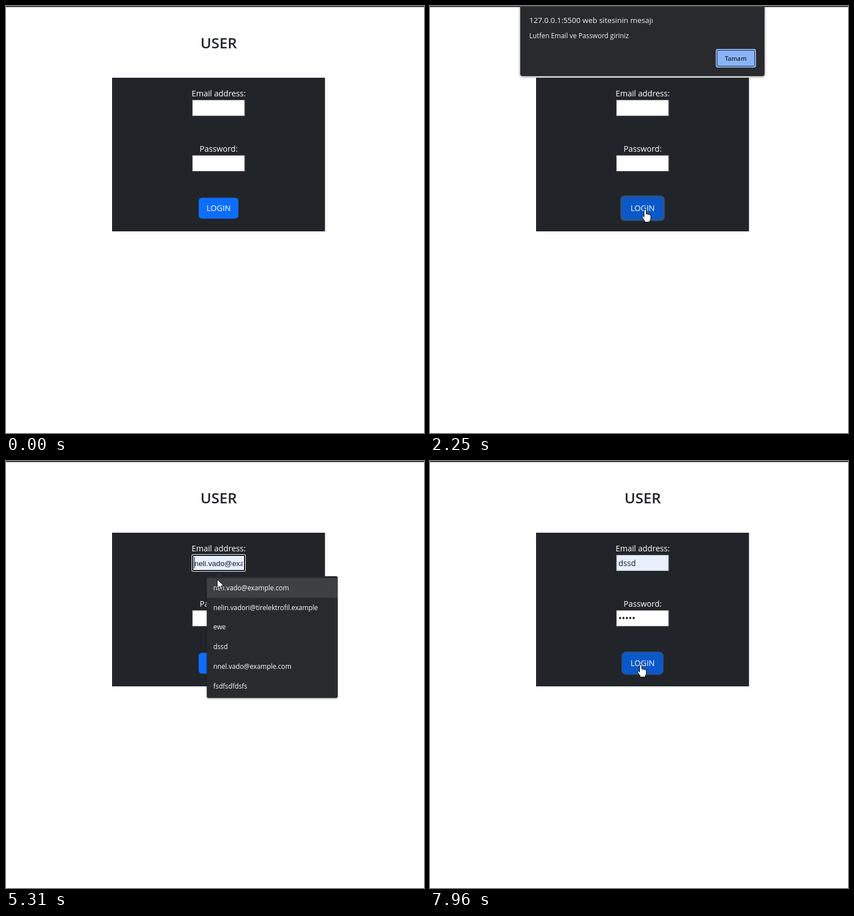
Write an HTML page that moves like this. It is 741 by 756 pixels and loops after 8000 ms.

```html
<!DOCTYPE html>
<html lang="en">
<head>
<meta charset="utf-8">
<title>User login</title>
<style>
  html, body { margin: 0; width: 100%; height: 100%; overflow: hidden; background: #fff; }
  svg { position: absolute; left: 0; top: 0; font: 14.2px "Open Sans", "Noto Sans", sans-serif; }
  .mid { text-anchor: middle; }
  .light { font-weight: 500; }
  #dialog {
    left: 160px; width: 433px; height: 124px; background: #292a2d; border-radius: 0 0 4px 4px;
    box-shadow: 0 1px 4px rgba(0, 0, 0, .55); transform-origin: 50% 0; fill: #f1f3f4;
  }
  #menu { font-size: 11.8px; fill: #fff; filter: drop-shadow(0 1px 1.5px rgba(0, 0, 0, .4)); }
  .preview { font: 13.33px "Liberation Sans", Arial, sans-serif; }
</style>
</head>
<body>
<svg width="741" height="756">
  <text class="mid" x="377" y="75" font-size="26" font-weight="600" fill="#212529">USER</text>
  <path d="M188 127h377.5v272H188z" fill="#212529"/>
  <g class="mid light" fill="#fff">
    <text x="377" y="160">Email address:</text>
    <text x="377" y="258">Password:</text>
  </g>
  <g id="email"></g>
  <g id="password"></g>
  <rect id="ring" rx="8" fill="#295493"/>
  <rect id="button" x="341.5" y="339.5" width="70.5" height="37" rx="6"/>
  <text class="mid light" x="377" y="363" fill="#fff">LOGIN</text>
</svg>

<svg id="dialog">
  <text class="light" x="16" y="30" font-size="13.4">127.0.0.1:5500 web sitesinin mesajı</text>
  <text class="light" x="16" y="57" font-size="11.8">Lutfen Email ve Password giriniz</text>
  <rect x="348" y="77" width="70" height="31.5" rx="4" fill="#8ab4f8"/>
  <rect id="okFocus" x="347.5" y="77" width="69.5" height="31" rx="3" fill="none" stroke="#8ab4f8" stroke-width="2"/>
  <rect id="okGap" x="349" y="78.5" width="66.5" height="28" rx="2" fill="none" stroke="#292a2d"/>
  <text class="mid" x="382" y="96.5" font-size="10.8" font-weight="600" fill="#202124" id="okText">Tamam</text>
</svg>

<svg width="741" height="756">
  <g id="menu" class="light">
    <path d="M370 204l7-7 7 7z" fill="#292a2d"/>
    <rect x="356" y="204" width="232" height="215.5" rx="3" fill="#292a2d"/>
    <rect id="hover" x="356" width="232" height="34.7" fill="#3f4042"/>
    <g id="items"></g>
  </g>
  <path d="M0 0h741v2H0z" fill="#3b3c3f"/>
  <path id="cursor" stroke="#000" stroke-linejoin="round"/>
</svg>

<script>
const $ = id => document.getElementById(id);
const LOOP = 8000, ROW = 34.7, MENU_TOP = 207.5;
const OPEN = 2020, CLOSE = 4480, PICK = 5890;
const CLICK_LOGIN = 1890, CLICK_EMAIL = 5130, CLICK_PASSWORD = 6250, CLICK_AGAIN = 7890;
const suggestions = [
  "neli.vado@example.com", "nelin.vadori@tirelektrofil.example", "ewe",
  "dssd", "nnel.vado@example.com", "fsdfsdfdsfs"
];
const shapes = {
  arrow: "M0 0V16L4 12.5 6.5 18.5 9 17.5 6.5 11.5H11.5Z",
  hand: "M-2 2Q-2 0 0 0T2 2V8Q4 6.5 5 8.5 7 7.5 8 9.5 10 8.5 10 11V15Q10 18 8 20V22H-1V20L-5 14Q-6 11-4 11L-2 13Z",
  beam: "M-3-8H-1Q0-8 0-7 0-8 1-8H3M0-7V7M-3 8H-1Q0 8 0 7 0 8 1 8H3"
};
// time, x, y, pointer shape from that time on
const path = [
  [770, 212, 697, "arrow"], [1050, 400, 520, "arrow"], [1250, 478, 326, "arrow"],
  [1410, 400, 345, "hand"], [1570, 380, 374, "hand"], [1650, 380, 374, "hand"],
  [1810, 381, 360, "hand"], [3569, 381, 360, "hand"], [3570, 401, 331, "hand"],
  [3690, 401, 331, "arrow"], [4130, 560, 32, "arrow"], [4370, 547, 84, "arrow"],
  [4620, 547, 84, "arrow"], [4980, 372, 180, "beam"], [5170, 372, 180, "beam"],
  [5230, 374, 196, "arrow"], [5310, 374, 209, "arrow"], [5370, 374, 209, "arrow"],
  [5630, 372, 325, "arrow"], [PICK, 372, 325, "arrow"], [6090, 357, 285, "beam"],
  [6250, 355, 279, "beam"], [7480, 355, 279, "beam"], [7560, 360, 300, "arrow"],
  [7700, 371, 345, "hand"], [7810, 373, 360, "hand"], [LOOP, 373, 360, "hand"]
];
const buttonColors = [
  [0, "#0d6efd"], [1410, "#0b5ed7"], [CLICK_LOGIN, "#0a58ca"], [CLOSE, "#0b5ed7"],
  [CLICK_EMAIL, "#0d6efd"], [7700, "#0b5ed7"], [CLICK_AGAIN, "#0a58ca"]
];

const clamp = v => Math.max(0, Math.min(1, v));
const between = (t, a, b) => t >= a && t < b;
const show = (el, on) => el.style.display = on ? "" : "none";
function set(el, attrs) {
  for (const name in attrs) el.setAttribute(name, attrs[name]);
}

$("items").innerHTML = suggestions.map((s, i) =>
  `<text x="367.5" y="${229 + i * ROW}">${s}</text>`).join("");

function field(id, y, { text = "", focus, fill = "#fff", caret, preview, size = 14.2 }) {
  const frame = focus
    ? `<rect x="329" y="${y - 1}" width="96" height="31" rx="3" fill="#fff"/>
       <rect x="331" y="${y + 1}" width="92" height="27" rx="1" fill="${fill}" stroke="#101010" stroke-width="2"/>`
    : `<rect x="330.5" y="${y + .5}" width="92.5" height="28" fill="${fill}" stroke="#767676"/>`;
  const bar = caret === undefined ? "" : `<path d="M${caret} ${y + 4}h1v20h-1z"/>`;
  $(id).innerHTML = `${frame}<svg x="333" y="${y}" width="87" height="29">
    <text x="1" y="20" ${preview ? 'class="preview"' : `font-size="${size}"`} fill="#111827">${text}</text></svg>${bar}`;
}

function pointer(t) {
  if (t < path[0][0]) return null;
  const i = path.findIndex(k => k[0] > t);
  const [t0, x0, y0, shape] = path[i - 1], [t1, x1, y1] = path[i];
  const p = (t - t0) / (t1 - t0);
  return { x: x0 + (x1 - x0) * p, y: y0 + (y1 - y0) * p, shape };
}

function drawDialog(t) {
  const alpha = t < CLOSE ? clamp((t - OPEN) / 230) : 1 - clamp((t - CLOSE) / 206);
  const tilt = Math.pow(1 - alpha, .6);
  show($("dialog"), alpha > 0);
  $("dialog").style.opacity = alpha;
  $("dialog").style.transform = tilt
    ? `translateY(${-18 * tilt}px) perspective(1400px) rotateX(${-10 * tilt}deg)` : "none";
  const pressed = t >= 4450;
  show($("okFocus"), !pressed);
  show($("okGap"), !pressed);
  set($("okText"), { opacity: pressed ? .75 : 1 });
}

function drawForm(t, row) {
  const previewing = between(t, 5310, PICK), picked = t >= PICK;
  const emailFocus = between(t, CLICK_EMAIL, CLICK_PASSWORD);
  field("email", 166, {
    text: previewing ? suggestions[row] : picked ? "dssd" : "",
    fill: previewing || picked ? "#e8f0fe" : "#fff",
    focus: emailFocus, preview: previewing,
    caret: emailFocus ? (picked ? 366 : 333.5) : undefined
  });

  const dots = Math.max(0, Math.min(5, Math.floor((t - 7060) / 90) + 1));
  const passwordFocus = between(t, CLICK_PASSWORD, CLICK_AGAIN);
  field("password", 264, {
    text: "•".repeat(dots), size: 16, focus: passwordFocus,
    caret: passwordFocus && !between(t, 6880, 7060) ? 334 + dots * 6.1 : undefined
  });

  const focusStart = t >= CLICK_AGAIN ? CLICK_AGAIN : CLICK_LOGIN;
  const ring = between(t, CLICK_EMAIL, CLICK_AGAIN) ? 0 : 4 * clamp((t - focusStart) / 150);
  set($("ring"), { x: 341.5 - ring, y: 339.5 - ring, width: 70.5 + 2 * ring, height: 37 + 2 * ring });
  show($("ring"), ring > 0);
  set($("button"), { fill: buttonColors.filter(c => c[0] <= t).pop()[1] });
}

function draw(now) {
  const t = now % LOOP, p = pointer(t);
  const row = p ? Math.max(0, Math.min(3, Math.floor((p.y - MENU_TOP) / ROW))) : 0;
  drawForm(t, row);
  drawDialog(t);

  show($("menu"), between(t, 5170, PICK));
  show($("hover"), t >= 5310);
  set($("hover"), { y: MENU_TOP + row * ROW });

  show($("cursor"), p);
  if (p) set($("cursor"), {
    d: shapes[p.shape], fill: p.shape === "beam" ? "none" : "#fff",
    transform: `translate(${Math.round(p.x) + .5} ${Math.round(p.y) + .5})`
  });
  requestAnimationFrame(draw);
}
requestAnimationFrame(draw);
</script>
</body>
</html>
```
